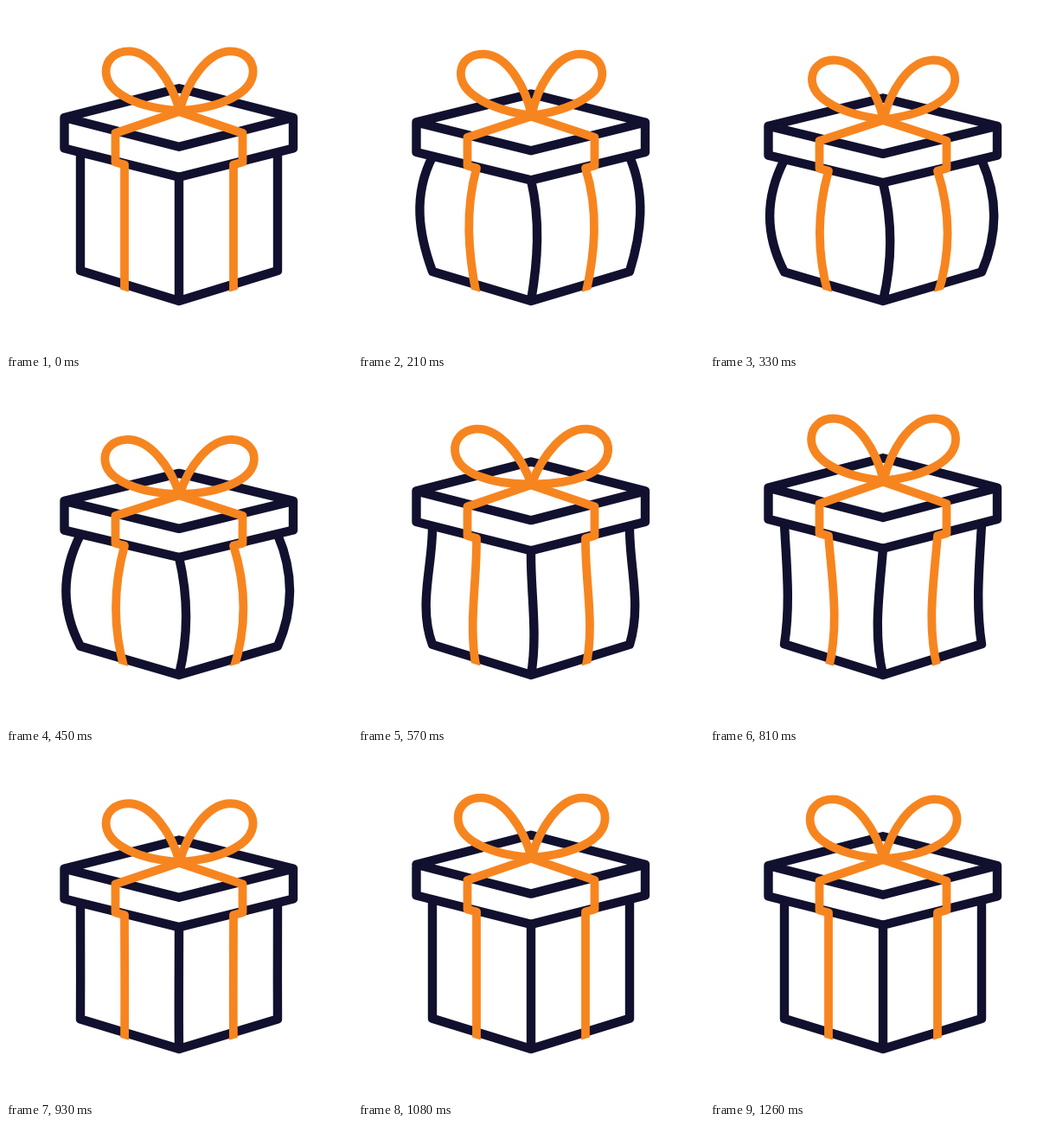
These frames come from a looping animation (400 px wide and 400 px high, 3320 ms). An HTML page with a canvas:

```html
<!DOCTYPE html>
<html lang="en">
<head>
<meta charset="utf-8">
<title>Gift box</title>
<style>
  html, body { margin: 0; width: 100%; height: 100%; overflow: hidden; background: #fff; }
  canvas { display: block; width: 400px; height: 400px; }
</style>
</head>
<body>
<canvas id="stage" width="400" height="400"></canvas>
<script>
const ctx = document.getElementById('stage').getContext('2d');
const LOOP = 3320, STEP = 30, END = 1260;
const NAVY = '#11102e', ORANGE = '#f7851f';
const CX = 200, BASE = 341, LAG = 80;

const smooth = u => u * u * (3 - 2 * u);

// Eased travel through [time, value] points, starting from rest
function track(...keys) {
  return t => {
    let from = [0, 0];
    for (const to of keys) {
      if (t < to[0]) {
        const u = Math.max(0, (t - from[0]) / (to[0] - from[0]));
        return from[1] + (to[1] - from[1]) * smooth(u);
      }
      from = to;
    }
    return from[1];
  };
}

const stretch = track([430, -0.053], [710, 0.059], [910, -0.018], [1080, 0.006], [1260, 0]);
const bulge = track([200, 1], [430, 1], [700, -1], [870, 0]);
const tilt = track([250, 0.075], [580, -0.085], [700, 0.075], [900, 0]);

function stroke(color, trace) {
  ctx.strokeStyle = color;
  ctx.beginPath();
  trace();
  ctx.stroke();
}

function draw(t) {
  const k = 1 + stretch(t), angle = tilt(t);
  const upper = bulge(t), lower = bulge(t - LAG);
  const Y = y => BASE - (BASE - y) * k;
  const move = (x, y) => ctx.moveTo(x, Y(y));
  const line = (x, y) => ctx.lineTo(x, Y(y));

  // Upright edge: bows by "out" when squashed and by "pinch" when stretched;
  // its lower half follows a little later
  const edge = (x, y0, y1, out, pinch) => {
    const shift = v => x + v * (v > 0 ? out : pinch);
    const ends = [shift(upper), shift(lower)];
    if (y1 < y0) ends.reverse();
    const third = (y1 - y0) / 3;
    ctx.bezierCurveTo(ends[0], Y(y0 + third), ends[1], Y(y1 - third), x, Y(y1));
  };

  ctx.fillStyle = '#fff';
  ctx.fillRect(0, 0, 400, 400);
  ctx.lineWidth = 10.4;
  ctx.lineCap = ctx.lineJoin = 'round';

  // Box
  stroke(NAVY, () => {
    move(86, 170);
    edge(86, 170, 306, -22.5, -8);
    line(CX, BASE);
    line(314, 306);
    edge(314, 306, 170, 19, 8);
    move(CX, 197.5);
    edge(CX, 197.5, BASE, 11, 13);
  });

  // Lid
  stroke(NAVY, () => {
    move(67.5, 129);
    line(CX, 95.3);
    line(332, 129);
    line(332, 164.5);
    line(CX, 197.7);
    line(67.5, 164.5);
    ctx.closePath();
    line(CX, 162.7);
    line(332, 129);
  });

  // Ribbon, trimmed along the lower edge of the box
  ctx.lineWidth = 9.8;
  ctx.save();
  ctx.beginPath();
  ctx.moveTo(0, 0);
  line(0, 287);
  line(CX, 348.4);
  line(400, 287);
  ctx.lineTo(400, 0);
  ctx.clip();
  for (const side of [-1, 1]) {
    stroke(ORANGE, () => {
      const x = CX + side * 63;
      move(CX, 122);
      line(CX + side * 73.5, 147);
      line(CX + side * 73.5, 180.5);
      line(x, 183.5);
      edge(x, 183.5, 334, side * (14.5 + side), side * 14);
    });
  }
  ctx.restore();

  // Bow
  for (const side of [-1, 1]) {
    ctx.save();
    ctx.translate(200.6, Y(121));
    ctx.scale(side, 1);
    ctx.rotate(-angle);
    const curve = (x1, y1, x2, y2, x, y) =>
      ctx.bezierCurveTo(x1, y1 * k, x2, y2 * k, x, y * k);
    stroke(ORANGE, () => {
      ctx.moveTo(0, 0);
      curve(45, -3, 85, -19, 85, -45.5);
      curve(85, -59, 74, -68.7, 59, -68.7);
      curve(32, -68.7, 9, -33, 0, 0);
    });
    ctx.restore();
  }
}

const start = performance.now();
function tick() {
  const t = (performance.now() - start) % LOOP;
  draw(Math.min(END, Math.floor(t / STEP) * STEP));
  requestAnimationFrame(tick);
}
tick();
</script>
</body>
</html>
```
